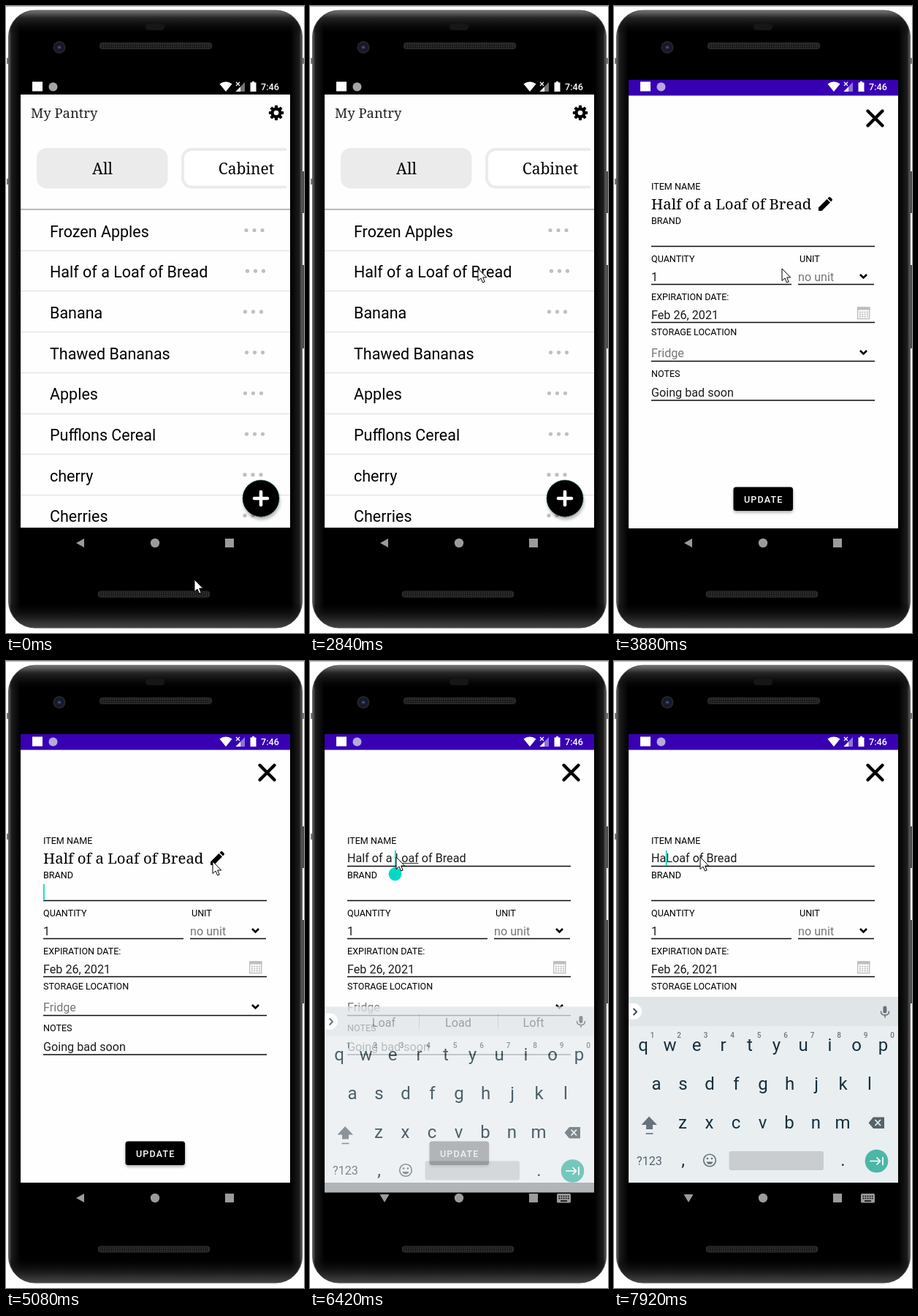
These frames come from a looping animation (408x857 px, 8 s). An HTML page:

```html
<!DOCTYPE html>
<html lang="en">
<head>
<meta charset="utf-8">
<title>Pantry</title>
<style>
html, body { margin: 0; width: 100%; height: 100%; overflow: hidden; background: #fff; }
svg { display: block; width: 408px; height: 857px; font-family: Roboto, sans-serif; }
.slab { font-family: "Noto Serif", serif; }
.row { font-size: 21.5px; }
.label { font-size: 12.57px; }
.field { font-size: 16.16px; fill: #1c1c1c; }
.hint { font-size: 16.16px; fill: #777; }
.rule { stroke: #0a0a0a; stroke-width: 1.5; }
.key { font-size: 24px; fill: #14303c; text-anchor: middle; }
.digit { font-size: 10px; font-weight: 500; fill: #6c777d; text-anchor: middle; }
.word { font-size: 16.2px; fill: #7b848a; text-anchor: middle; }
.line { fill: none; stroke-linecap: round; stroke-linejoin: round; }
</style>
</head>
<body>
<svg viewBox="0 0 408 857">
  <defs>
    <linearGradient id="side">
      <stop offset="0" stop-color="#666"/><stop offset=".01" stop-color="#1c1c1c"/>
      <stop offset=".04" stop-color="#000"/><stop offset=".96" stop-color="#000"/>
      <stop offset=".99" stop-color="#1c1c1c"/><stop offset="1" stop-color="#666"/>
    </linearGradient>
    <linearGradient id="ends" x2="0" y2="1">
      <stop offset="0" stop-color="#777"/><stop offset=".012" stop-color="#262626"/>
      <stop offset=".04" stop-color="#000" stop-opacity="0"/>
      <stop offset=".957" stop-color="#000" stop-opacity="0"/>
      <stop offset=".99" stop-color="#2e2e2e"/><stop offset="1" stop-color="#444"/>
    </linearGradient>
    <pattern id="mesh" width="3" height="3" patternUnits="userSpaceOnUse">
      <rect width="3" height="3" fill="#161616"/><circle cx="1.5" cy="1.5" r=".9" fill="#3c3c3c"/>
    </pattern>
    <radialGradient id="lens">
      <stop offset="0" stop-color="#5a6cc0"/><stop offset=".25" stop-color="#1c2348"/>
      <stop offset=".55" stop-color="#14151c"/><stop offset="1" stop-color="#2a2a2a"/>
    </radialGradient>
    <clipPath id="page"><rect x="20" y="121" width="369" height="592"/></clipPath>
    <clipPath id="tabs"><rect x="20" y="180" width="364" height="80"/></clipPath>
    <filter id="soft" x="-30%" y="-30%" width="160%" height="160%"><feGaussianBlur stdDeviation="2"/></filter>
  </defs>

  <!-- phone -->
  <path d="M0 .5H408" stroke="#b5b5b5"/>
  <path d="M1 75H6M1 240H6M403 75H408" stroke="#777" stroke-width="8"/>
  <path d="M406 226V283M406 354V468" stroke="#4c4c4c" stroke-width="4"/>
  <rect x="3.5" y="6" width="402" height="844" rx="36" fill="url(#side)"/>
  <rect x="3.5" y="6" width="402" height="844" rx="36" fill="url(#ends)" stroke="#555"/>
  <rect x="191" y="24" width="26" height="9" rx="4" fill="#161616"/>
  <circle cx="73" cy="56.5" r="8.5" fill="url(#lens)"/>
  <rect x="128.5" y="50.5" width="153" height="8" rx="3" fill="url(#mesh)" stroke="#333"/>
  <rect x="126.5" y="800" width="152" height="8" rx="3" fill="url(#mesh)" stroke="#333"/>

  <!-- pantry list -->
  <g clip-path="url(#page)">
    <rect x="20" y="121" width="369" height="592" fill="#fefefe"/>
    <text class="slab" x="34" y="153" font-size="18.4" fill="#222">My Pantry</text>
    <g id="gear" transform="translate(370 146)"><circle r="7.6"/></g>
    <g clip-path="url(#tabs)">
      <rect x="42" y="194" width="179.5" height="55.5" rx="14" fill="#ebebeb"/>
      <rect x="242" y="196" width="176" height="51.5" rx="12" fill="#fff" stroke="#ebebeb" stroke-width="4"/>
      <g class="slab" font-size="21" text-anchor="middle"><text x="132" y="230">All</text><text x="329" y="230">Cabinet</text></g>
    </g>
    <g id="rows"></g>
    <circle cx="350" cy="677" r="25" opacity=".3" filter="url(#soft)"/>
    <circle cx="349" cy="673" r="25" stroke="#0a4a42" stroke-width=".6"/>
    <path class="line" d="M340 673H358M349 664V682" stroke="#fff" stroke-width="4.6"/>
  </g>

  <!-- item form -->
  <g id="form">
    <rect x="20" y="100" width="369" height="613" fill="#fefefe"/>
    <rect x="20" y="100" width="369" height="21.5" fill="#3700b3"/>
    <path class="line" d="M347.5 142.5L367.5 162.5M367.5 142.5L347.5 162.5" stroke="#000" stroke-width="4.4"/>
    <g id="labels" class="label"></g>
    <g id="title">
      <text class="slab" x="51" y="276.5" font-size="20.4">Half of a Loaf of Bread</text>
      <path d="M280 279V274.5L291.5 263L296 267.5L284.5 279ZM292.5 262L294.3 260.2Q295.3 259.6 296.3 260.4L298.6 262.7Q299.3 263.7 298.6 264.7L297 266.5Z"/>
    </g>
    <g id="edit">
      <text id="name" class="field" x="51" y="275"></text>
      <path class="rule" d="M51 280.5H357"/>
      <path id="compose" d="M118 276.5H148.5" stroke="#333"/>
    </g>
    <path class="rule" d="M51 327.5H357M51 379.5H243M252 379.5H356M51 431.5H357M51 484.5H357M51 538H357"/>
    <g class="field">
      <text x="51" y="374.5">1</text><text x="51" y="426.5">Feb 26, 2021</text><text x="51" y="532.5">Going bad soon</text>
    </g>
    <g class="hint"><text x="252" y="374.5">no unit</text><text x="51" y="479">Fridge</text></g>
    <path d="M337 366L341.5 370.5L346 366M337 470L341.5 474.5L346 470" fill="none" stroke="#000" stroke-width="2.6"/>
    <g fill="none" stroke="#bdbdbd">
      <rect x="333.7" y="411" width="16" height="15.5" stroke-width="1.4"/>
      <path d="M333 412.5H350.5" stroke-width="4"/>
      <path d="M336 417.5H348M336 420.5H348M336 423.5H348" stroke-width="1.8" stroke-dasharray="1.9 1.4"/>
    </g>
    <rect x="164" y="659" width="81" height="32" rx="3" opacity=".35" filter="url(#soft)"/>
    <rect x="163.5" y="656.5" width="81.5" height="32.5" rx="3.5"/>
    <text x="178" y="677.7" font-size="12.57" font-weight="500" letter-spacing="1.12" fill="#fff">UPDATE</text>
    <rect id="brandCaret" x="51" y="305" width="1.8" height="21" fill="#03dac5"/>
    <g id="caret" fill="#03dac5">
      <rect x="-.5" y="259" width="1.8" height="21"/>
      <path id="handle" d="M0 281L6 284.5A9 9 0 1 1 -6 284.5Z"/>
    </g>
  </g>

  <!-- keyboard -->
  <g id="board">
    <rect x="20" y="459" width="369" height="254" fill="#e9eef1"/>
    <rect x="20" y="459" width="369" height="40" fill="#e0e5e8"/>
    <path d="M20 468H27A11 11 0 0 1 27 490H20Z" fill="#fff"/>
    <path class="line" d="M27 475.5L31 479.5L27 483.5" stroke="#37474f" stroke-width="1.8"/>
    <rect x="368.4" y="471.5" width="5" height="10" rx="2.5" fill="#66737a"/>
    <path class="line" d="M365.5 479Q365.5 484 371 484T376.5 479M371 484V487" stroke="#66737a" stroke-width="1.5"/>
    <g id="words"><path d="M149.5 469V490M257.5 469V490" stroke="#c3c9cc"/></g>
    <g id="keys"></g>
    <path d="M48 622.5L59 634H53V640H44V634H37.5Z" fill="#66737a"/>
    <path d="M43.5 646H53.5" stroke="#66737a" stroke-width="1.6"/>
    <path d="M348.5 631.3L355 623.5H370V639H355Z" fill="#55646c"/>
    <path d="M357.5 627L365 635M365 627L357.5 635" stroke="#e9eef1" stroke-width="1.8"/>
    <text x="31" y="688.5" font-size="16.2" fill="#55646c">?123</text>
    <circle cx="131" cy="682.5" r="8.3" fill="none" stroke="#66737a" stroke-width="1.6"/>
    <path d="M126.5 684.5A4.7 4.7 0 0 0 135.5 684.5Z" fill="#66737a"/>
    <circle cx="128" cy="680" r="1.3" fill="#66737a"/><circle cx="134" cy="680" r="1.3" fill="#66737a"/>
    <rect x="157.5" y="670" width="129.5" height="26" rx="3" fill="#c9cdd0"/>
    <circle cx="359.5" cy="683.5" r="15.8" fill="#4cb6a7"/>
    <path class="line" d="M351 683.5H364M360 679L364.5 683.5L360 688M368 678.5V688.5" stroke="#fff" stroke-width="1.7"/>
  </g>

  <!-- system bars -->
  <g fill="#fff">
    <rect x="36" y="103.5" width="14" height="13"/>
    <circle cx="64.5" cy="110.5" r="6" opacity=".65"/>
    <path d="M292.5 106.5Q301 100.5 309.5 106.5L301 117Z"/>
    <path d="M327 104V117H314.5Z" opacity=".45"/><path d="M321 110.5V117H314.5Z"/>
    <path d="M315 104L320 109M320 104L315 109" stroke="#fff" stroke-width="1.2"/>
    <path d="M337 103H340V104.5H342.5V117H334.5V104.5H337Z"/>
    <text x="349" y="115" font-size="12.6" font-weight="500">7:46</text>
  </g>
  <g fill="#9b9b9b">
    <path id="back"/><circle cx="204" cy="734" r="6.2"/><rect x="300" y="728" width="12" height="12"/>
    <g id="switch">
      <rect x="338" y="728" width="19" height="12.5" rx="1.5"/>
      <path d="M340.5 731.5H355M340.5 734.5H355" stroke="#000" stroke-width="1.7" stroke-dasharray="1.7 1.4"/>
      <path d="M343 738H352" stroke="#000" stroke-width="1.5"/>
    </g>
  </g>
  <path id="mouse" d="M0 0V16.5L4 13L6.6 19L9.2 18L6.7 12H11.7Z" fill="#fff" stroke="#000"/>
</svg>

<script>
const LOOP = 8000;
const $ = id => document.getElementById(id);

function add(parent, tag, attrs, text = '') {
  const el = document.createElementNS('http://www.w3.org/2000/svg', tag);
  for (const k in attrs) el.setAttribute(k, attrs[k]);
  el.textContent = text;
  return parent.appendChild(el);
}
const set = (id, k, v) => $(id).setAttribute(k, v);
const show = (id, on) => set(id, 'display', on ? 'inline' : 'none');

for (let i = 0; i < 8; i++)
  add($('gear'), 'rect', { x: -2.1, y: -10.2, width: 4.2, height: 5, rx: 1, transform: `rotate(${i * 45})` });
add($('gear'), 'circle', { r: 3.3, fill: '#fff' });

const foods = [
  ['Frozen Apples', 340], ['Half of a Loaf of Bread', 341.5], ['Banana', 338.5], ['Thawed Bananas', 340.5],
  ['Apples', 338.5], ['Pufflons Cereal', 340.5], ['cherry', 338], ['Cherries', 338]
];
foods.forEach(([food, x], i) => {
  const y = 278 + i * 55.7;
  add($('rows'), 'path', { d: `M20 ${i ? Math.round(y) + .5 : y}H389`, stroke: i ? '#dedede' : '#b8b8b8', 'stroke-width': i ? 1 : 2 });
  add($('rows'), 'text', { class: 'row', x: 60, y: y + 37.55 }, food);
  for (const d of [-11, 0, 11]) add($('rows'), 'circle', { cx: x + d, cy: y + 28.5, r: 2.6, fill: '#c0c0c0' });
});

[['ITEM NAME', 51, 250], ['BRAND', 51, 296.5], ['QUANTITY', 51, 349], ['UNIT', 254, 349],
 ['EXPIRATION DATE:', 51, 401], ['STORAGE LOCATION', 51, 449], ['NOTES', 51, 505.5]]
  .forEach(([s, x, y]) => add($('labels'), 'text', { x, y }, s));

[['qwertyuiop', 40, 532.5], ['asdfghjkl', 58, 585.5], ['zxcvbnm', 94, 638.5]].forEach(([row, x0, y], r) =>
  [...row].forEach((c, i) => {
    const x = x0 + i * 36.5;
    add($('keys'), 'text', { class: 'key', x, y }, c);
    if (!r) add($('keys'), 'text', { class: 'digit', x: x + 12.5, y: 515 }, (i + 1) % 10);
  }));
add($('keys'), 'text', { class: 'key', x: 94.5, y: 690 }, ',');
add($('keys'), 'text', { class: 'key', x: 313.5, y: 690 }, '.');
const words = [101, 203, 306].map(x => add($('words'), 'text', { class: 'word', x, y: 486 }));

// [time, ...values], linear between entries
const mousePath = [
  [0, 258, 784], [940, 258, 784], [1080, 340, 640], [1200, 385, 470], [1270, 345, 400], [1380, 240, 450],
  [1510, 178, 562], [1590, 178, 562], [1700, 167, 549], [1820, 164, 548], [2140, 164, 548], [2380, 215, 470],
  [2560, 249, 400], [2700, 240, 365], [2840, 230, 359], [4190, 230, 359], [4500, 256, 312], [4780, 277, 272],
  [4960, 277, 272], [5080, 283, 274], [5440, 282, 273], [5680, 200, 254], [5980, 118, 268]
];
const formMove = [[3760, 22, .35], [3820, 8, .8], [3880, 1, 1], [3930, 1, 1], [3940, 0, 1]];
const boardMove = [[6300, 43, .1], [6360, 28, .42], [6420, 13.5, .76], [6475, 13.5, .76], [6480, 4, .95], [6540, 0, 1]];
const deletes = [6720, 6840, 7020, 7200, 7380, 7560, 7740, 7920];
const hints = [[0, 'Loaf', 'Load', 'Loft'], [6780], [7500, 'of', 'a', 'an'], [7620]];

function at(track, t) {
  const i = track.findIndex(k => k[0] > t);
  if (i === 0) return track[0].slice(1);
  if (i < 0) return track[track.length - 1].slice(1);
  const a = track[i - 1], b = track[i], p = (t - a[0]) / (b[0] - a[0]);
  return a.slice(1).map((v, k) => v + (b[k + 1] - v) * p);
}

function slide(id, track, t) {
  const [dy, alpha] = at(track, t);
  set(id, 'transform', `translate(0 ${dy})`);
  set(id, 'opacity', alpha);
  show(id, t >= track[0][0]);
}

function render(t) {
  set('mouse', 'transform', `translate(${at(mousePath, t)})`);
  slide('form', formMove, t);
  slide('board', boardMove, t);

  const editing = t >= 5200, focused = t >= 6120, typing = t >= 6300;
  show('title', !editing);
  show('edit', editing);
  show('brandCaret', !focused && Math.floor((t - 3940) / 500) % 2 === 0);

  const gone = deletes.filter(d => t >= d).length;
  const head = 'Half of a '.slice(0, 10 - gone);
  $('name').textContent = head + 'Loaf of Bread';
  show('caret', focused);
  if (editing) set('caret', 'transform', `translate(${51 + $('name').getSubStringLength(0, head.length)} 0)`);
  show('handle', !gone);
  show('compose', typing && !gone);

  const hint = hints.filter(h => t >= h[0]).pop();
  show('words', hint[1]);
  words.forEach((w, i) => { w.textContent = hint[i + 1] || ''; });

  set('back', 'd', typing ? 'M95.5 729H108.5L102 740Z' : 'M107 728V740L96 734Z');
  show('switch', typing);
}

const start = performance.now();
function tick() {
  render((performance.now() - start) % LOOP);
  requestAnimationFrame(tick);
}
tick();
</script>
</body>
</html>
```
